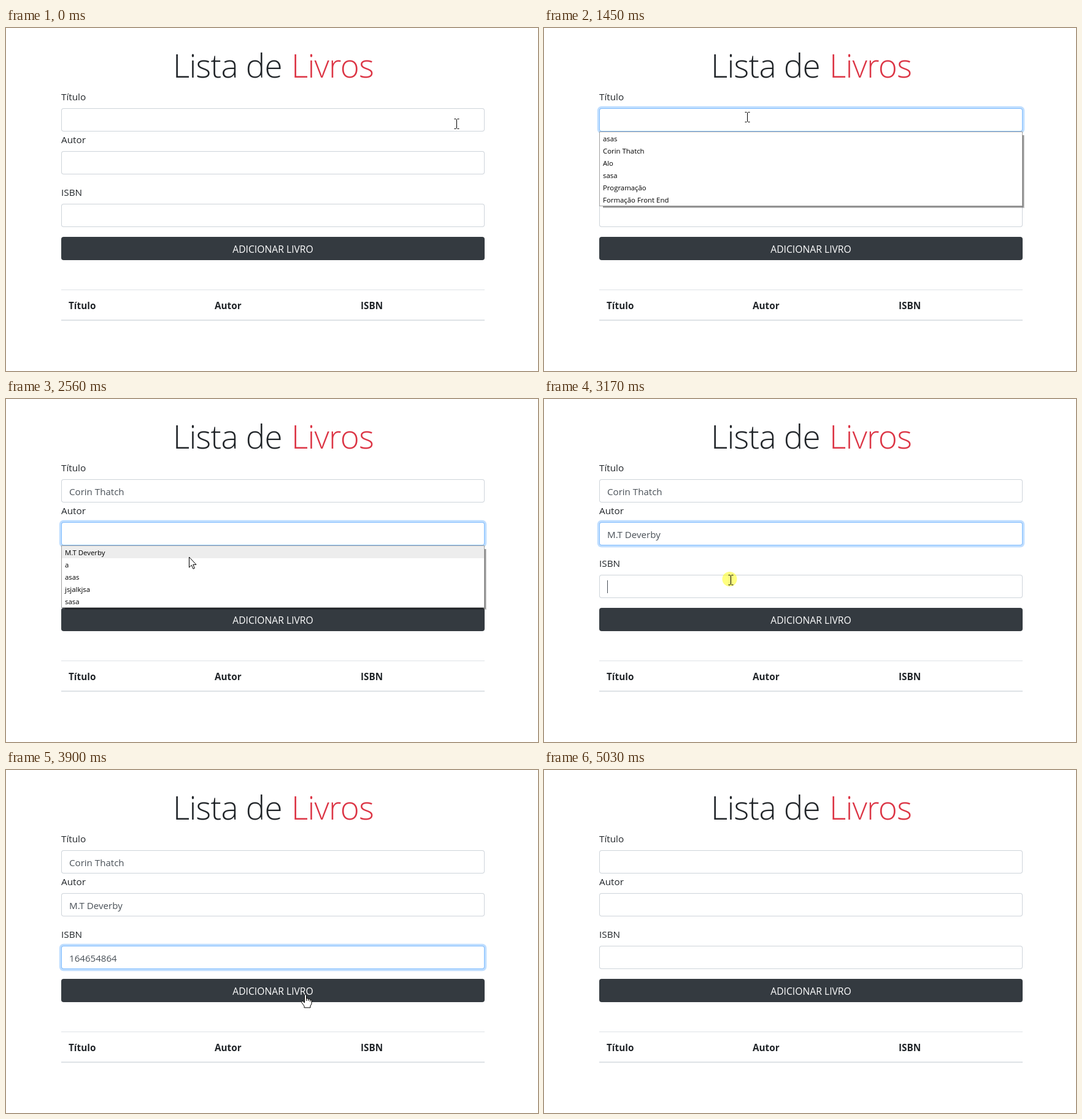
Animation of 867 by 560 pixels, one loop 5.06 s. Source, as an HTML page with a canvas:

```html
<!DOCTYPE html>
<html lang="pt">
<head>
<meta charset="utf-8">
<title>Lista de Livros</title>
<style>
  html, body { margin: 0; width: 100%; height: 100%; overflow: hidden; background: #fff; }
  canvas { display: block; }
</style>
</head>
<body>
<canvas width="867" height="560"></canvas>
<script>
const ctx = document.querySelector('canvas').getContext('2d');
const LOOP = 5060, SUBMIT = 4560, LEFT = 90, WIDTH = 690, HEIGHT = 38, ROW = 20;
const BUTTON_Y = 341, TRAVEL = 400;
const FONT = '"Open Sans", "Noto Sans", sans-serif';

// One click focuses a field, one opens its suggestions, one picks from them
const fields = [
  { label: 'Título', y: 131, focus: 390, open: 1040, close: 1880, pick: 1,
    items: ['asas', 'Corin Thatch', 'Alo', 'sasa', 'Programação', 'Formação Front End'] },
  { label: 'Autor', y: 201, focus: 2050, open: 2280, close: 2850, pick: 0,
    items: ['M.T Deverby', 'a', 'asas', 'jsjalkjsa', 'sasa'] },
  { label: 'ISBN', y: 287, focus: 3165, open: 3400, close: 3720, pick: 0,
    items: ['164654864', '1212', 'asas', '21212', 'sasa', '454'] }
];
fields.forEach((f, i) => f.blur = fields[i + 1]?.focus ?? SUBMIT);
const clicks = [...fields.flatMap(f => [f.focus, f.open, f.close]), SUBMIT];

// Where the pointer rests, with its time of arrival
const stops = [
  { at: 0, x: 734, y: 156 },
  { at: 420, x: 333, y: 142 },
  { at: 1800, x: 288, y: 200 },
  { at: 2050, x: 293, y: 212 },
  { at: 2480, x: 298, y: 258 },
  { at: 3140, x: 304, y: 295 },
  { at: 3660, x: 303, y: 336 },
  { at: 3890, x: 487, y: 366 },
  { at: 4250, x: 501, y: 368 },
  { at: 5020, x: 862, y: 568 }
];

const arrow = new Path2D('M.5 0V17L4.3 13.3L7 19.3L9.4 18.2L6.8 12.4H12Z');
const beam = new Path2D('M-3.5-7.5H-.5M1.5-7.5H4.5M.5-7V8M-3.5 8.5H-.5M1.5 8.5H4.5');
const hand = new Path2D('M-.5 1.5Q1-.5 2.5 1.5V7Q4 6 5.5 8Q7 7 8.5 9Q11 8 11 11V16' +
  'L9 19V22H-1V19.5L-5.5 13Q-5.5 10.5-3 11.5L-.5 14Z');
const fingers = new Path2D('M2.5 7V11M5.5 8V11M8.5 9V12');

const within = (t, a, b) => t >= a && t < b;
const ease = v => {
  v = Math.max(0, Math.min(1, v));
  return v * v * (3 - 2 * v);
};

function text(str, x, y, size, color = '#212529', weight = 400, align = 'left') {
  ctx.font = `${weight} ${size}px ${FONT}`;
  ctx.textAlign = align;
  ctx.fillStyle = color;
  ctx.fillText(str, x, y);
}

function rect(x, y, w, h, color) {
  ctx.fillStyle = color;
  ctx.fillRect(x, y, w, h);
}

function box(grow, y, radius, color) {
  ctx.beginPath();
  ctx.roundRect(LEFT - grow, y - grow, WIDTH + 2 * grow, HEIGHT + 2 * grow, radius);
  ctx.fillStyle = color;
  ctx.fill();
}

function pointerAt(t) {
  let { x, y } = stops[0];
  stops.slice(1).forEach((stop, i) => {
    const travel = Math.min(TRAVEL, stop.at - stops[i].at);
    const k = ease(1 + (t - stop.at) / travel);
    x += (stop.x - x) * k;
    y += (stop.y - y) * k;
  });
  return [x, y];
}

function drawTitle() {
  ctx.letterSpacing = '-0.8px';
  text('Lista de', 272, 81, 53, '#212529', 300);
  text('Livros', 465, 81, 53, '#dc3545', 300);
  ctx.letterSpacing = '0px';
}

function drawField(f, t) {
  const glow = ease((t - f.focus) / 150) - ease((t - f.blur) / 150);
  text(f.label, LEFT, f.y - 13, 15.3);
  box(3.2, f.y, 7, `rgba(0,123,255,${0.25 * glow})`);
  box(0, f.y, 4, '#ced4da');
  box(0, f.y, 4, `rgba(128,189,255,${glow})`);
  box(-1, f.y, 3, '#fff');

  const value = within(t, f.close, SUBMIT) ? f.items[f.pick] : '';
  text(value, 103, f.y + 26, 15.1, '#495057');
  const caretOn = (t - f.focus) % 1000 < 500 && !within(t, f.open, f.close);
  if (caretOn && within(t, f.focus, f.blur)) {
    rect(103 + Math.round(ctx.measureText(value).width), f.y + 9, 1, 21, '#495057');
  }
}

function drawList(f, t, py) {
  const top = f.y + HEIGHT, height = f.items.length * ROW + 2;
  for (let i = 1; i <= 3; i++) rect(LEFT + 6, top + 6, WIDTH - 6 + i, height - 6 + i, 'rgba(0,0,0,.2)');
  rect(LEFT, top, WIDTH, height, '#a0a0a0');
  rect(LEFT + 1, top + 1, WIDTH - 2, height - 2, '#fff');
  const hovered = Math.floor((py - top - 1) / ROW);
  const selecting = t > f.close - 150;
  f.items.forEach((item, i) => {
    const y = top + 1 + i * ROW;
    if (i === hovered) rect(LEFT + 1, y, WIDTH - 2, ROW, selecting ? '#0078d7' : '#ededed');
    text(item, 96, y + 15, 11.4, i === hovered && selecting ? '#fff' : '#000');
  });
}

function drawPointer(t, x, y, list) {
  if (clicks.some(c => within(t, c - 60, c + 20))) {
    ctx.beginPath();
    ctx.arc(x - 1.5, y - 1, 12, 0, 7);
    ctx.fillStyle = 'rgba(255,255,0,.5)';
    ctx.fill();
  }
  const overList = list && y >= list.y + HEIGHT;
  const over = top => !overList && within(x, LEFT, LEFT + WIDTH) && within(y, top, top + HEIGHT);
  ctx.save();
  ctx.translate(Math.round(x), Math.round(y));
  ctx.strokeStyle = '#000';
  ctx.fillStyle = '#fff';
  if (fields.some(f => over(f.y))) {
    ctx.stroke(beam);
  } else {
    const shape = over(BUTTON_Y) ? hand : arrow;
    ctx.fill(shape);
    ctx.stroke(shape);
    if (shape === hand) ctx.stroke(fingers);
  }
  ctx.restore();
}

function draw() {
  const t = performance.now() % LOOP;
  const [x, y] = pointerAt(t);
  rect(0, 0, 867, 560, '#fff');

  drawTitle();
  fields.forEach(f => drawField(f, t));
  box(0, BUTTON_Y, 4, '#343a40');
  text('ADICIONAR LIVRO', LEFT + WIDTH / 2, BUTTON_Y + 26, 15.7, '#fff', 400, 'center');

  rect(LEFT, 427, WIDTH, 1, '#dee2e6');
  rect(LEFT, 476, WIDTH, 2, '#dee2e6');
  fields.forEach((f, i) => text(f.label, 102 + i * 238, 459, 15.3, '#212529', 700));

  const list = fields.find(f => within(t, f.open, f.close));
  if (list) drawList(list, t, y);
  drawPointer(t, x, y, list);
  requestAnimationFrame(draw);
}
draw();
</script>
</body>
</html>
```
